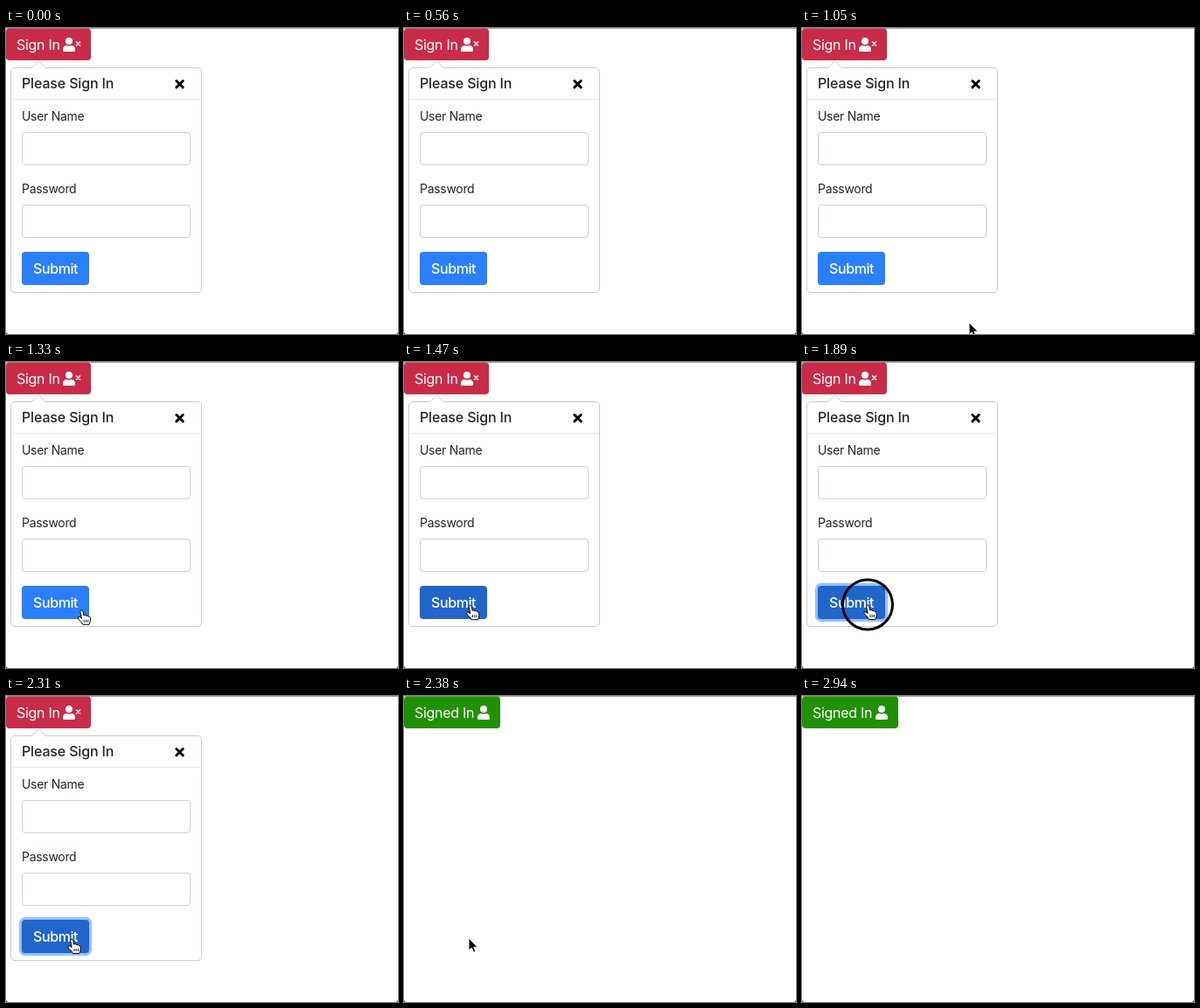
An HTML page for the animation above (3.64 s loop, 448 by 350 pixels).

```html
<!DOCTYPE html>
<html lang="en">
<head>
<meta charset="utf-8">
<title>Sign in popover</title>
<style>
  html, body { margin: 0; width: 100%; height: 100%; overflow: hidden; background: #fff; }
  svg { display: block; width: 448px; height: 350px; }
  text { font: 16px Inter, "Open Sans", sans-serif; letter-spacing: -.3px; fill: #212529; }
  .label { font-size: 14px; }
  .title { font-weight: 500; letter-spacing: -.15px; }
  .white, .white text { fill: #fff; }
  .submit { font-weight: 500; letter-spacing: -.4px; }
  .field { fill: #fff; stroke: #ced2d8; }
  .cross { fill: none; stroke-linecap: round; }
</style>
</head>
<body>
<svg viewBox="0 0 448 350">
  <defs>
    <g id="user">
      <circle cx="7" cy="4" r="4"/>
      <path d="M4.2 9h.5a5.5 5.5 0 0 0 4.6 0h.5A4.2 4.2 0 0 1 14 13.2v1.3a1.5 1.5 0 0 1-1.5 1.5h-11A1.5 1.5 0 0 1 0 14.500v-1.300A4.200 4.200 0 0 1 4.200 9z"/>
    </g>
  </defs>

  <path d="M0 .5H448" stroke="#a6a6a6"/>
  <path d="M0 347.500V350H2.500Q.5 349.500 0 347.500zM448 347.500V350H445.500Q447.500 349.500 448 347.500z" fill="#555"/>

  <g id="signedOut">
    <g class="white">
      <rect y=".5" width="97" height="36.500" rx="4" fill="#c82c48"/>
      <text x="12" y="25">Sign In</text>
      <use href="#user" x="65" y="11"/>
      <path class="cross" d="M80.500 16l4 4m0-4l-4 4" stroke="#fff" stroke-width="1.600"/>
    </g>
    <rect x="5.500" y="45.500" width="218" height="257" rx="4.500" fill="#fff" stroke="#ccc"/>
    <path d="M29 46L37.500 38L46 46" fill="#fff" stroke="#d0d0d0"/>
    <path d="M6 81.500H223" stroke="#ebebeb"/>
    <text class="title" x="18" y="69">Please Sign In</text>
    <path class="cross" d="M194.800 60.500l7.400 7.400m0-7.400l-7.400 7.400" stroke="#000" stroke-width="2.900"/>
    <text class="label" x="18" y="106">User Name</text>
    <rect class="field" x="18.500" y="119.500" width="192" height="37" rx="3.500"/>
    <text class="label" x="18" y="189">Password</text>
    <rect class="field" x="18.500" y="202.500" width="192" height="37" rx="3.500"/>
    <rect id="glow" x="15" y="253" width="83" height="44" rx="6.500" fill="#94c1fb"/>
    <rect id="submit" x="18" y="256" width="77" height="38" rx="4"/>
    <text class="submit white" x="31" y="281">Submit</text>
  </g>

  <g id="signedIn" class="white">
    <rect y=".5" width="110" height="36.500" rx="4" fill="#229006"/>
    <text x="12" y="25">Signed In</text>
    <use href="#user" x="84" y="11"/>
  </g>

  <circle id="ring" cx="75" cy="277.500" fill="none" stroke="#000" stroke-width="3"/>
  <path id="arrow" d="M0 0V14L3.200 11L5.600 16.200L8 15.200L5.700 10.200H10z" fill="#000" stroke="#fff"/>
  <g id="hand" stroke="#000" stroke-linejoin="round" fill="#fff">
    <path d="M-1.500 1.500Q-1.500 0 0 0T1.700 1.500L2.700 6Q4.500 4.900 5.500 6.600Q7.300 5.700 8.100 7.500Q10 7.200 10.200 9V12Q10 14 8.700 16.500H1.500Q.5 14-2.500 11.500Q-5 9-3.600 8T.2 9.500z"/>
    <path d="M3 11v3m2.200-3v3m2.200-3v3" stroke-width=".9"/>
  </g>
</svg>
<script>
  const LOOP = 3640, TICK = 70;
  const ENTER = 1050, HOVER = 1330, PRESS = 1680, RELEASE = 2100, DONE = 2380, LEAVE = 2660, GONE = 2940;
  const $ = id => document.getElementById(id);
  const progress = (t, start, length) => Math.min(1, Math.max(0, (t - start) / length));
  const mix = (a, b, k) => a + (b - a) * k;
  const show = (id, visible) => $(id).setAttribute("display", visible ? "inline" : "none");
  const blue = [43, 127, 250], darkBlue = [33, 101, 203];

  function cursorAt(t) {
    if (t < DONE) {
      const k = 1 - (1 - progress(t, ENTER, 490)) ** 2.75;
      return [mix(191, 75, k), mix(337, 278, k)];
    }
    const k = progress(t, LEAVE, 210) ** 2;
    return [mix(74, 121, k), mix(277, 325, k)];
  }

  function draw(t) {
    const done = t >= DONE;
    show("signedOut", !done);
    show("signedIn", done);

    const hover = progress(t, HOVER, 140);
    $("submit").setAttribute("fill", `rgb(${blue.map((c, i) => mix(c, darkBlue[i], hover))})`);
    $("glow").setAttribute("opacity", progress(t, PRESS - TICK, 150));

    const fade = progress(t, RELEASE, 210);
    show("ring", t >= PRESS && fade < 1);
    $("ring").setAttribute("r", mix(14, 28.5, progress(t, PRESS - TICK, 210)) + 2 * fade);
    $("ring").setAttribute("opacity", 1 - fade);

    const pointing = t >= HOVER && !done;
    const place = `translate(${cursorAt(t)})`;
    show("hand", pointing);
    show("arrow", t >= ENTER && t < GONE && !pointing);
    $("hand").setAttribute("transform", place);
    $("arrow").setAttribute("transform", place);
  }

  const begin = performance.now();
  function frame() {
    const t = (performance.now() - begin) % LOOP;
    draw(Math.floor(t / TICK) * TICK);
    requestAnimationFrame(frame);
  }
  frame();
</script>
</body>
</html>
```
